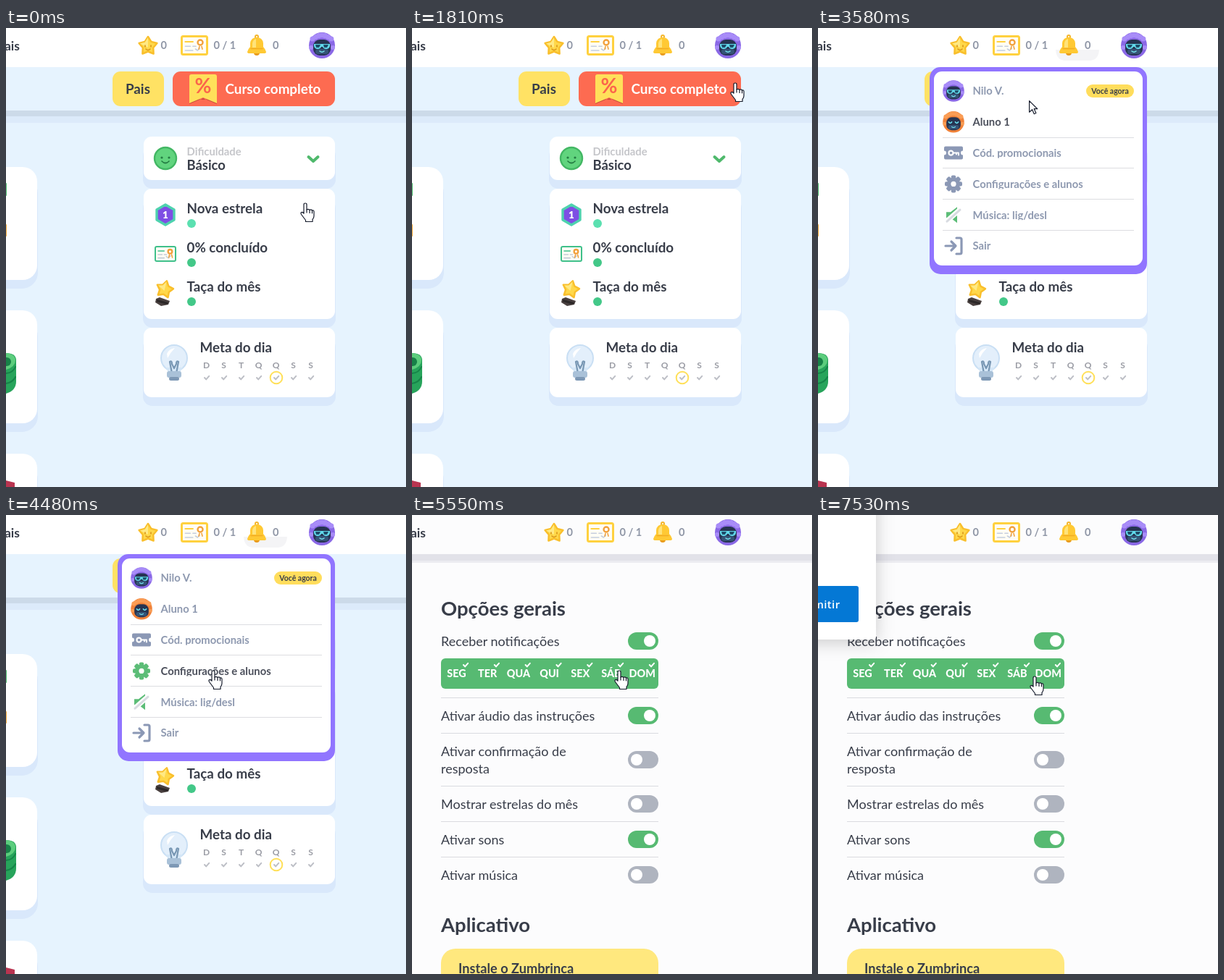
These frames come from a looping animation (552 px wide and 634 px high, 8 s). An HTML page:

```html
<!DOCTYPE html>
<html lang="pt">
<head>
<meta charset="utf-8">
<style>
html, body { margin: 0; width: 100%; height: 100%; overflow: hidden; background: #fff; }
svg { position: absolute; left: 0; top: 0; font-family: Lato, sans-serif; }
#menu { left: 154px; top: 54px; transform-origin: 50% 0; }
#menu .row { color: #8e99b0; }
#menu .row.hover { color: #4c505c; }
#menu .icon { color: #8b98b5; }
#menu .hover .icon { color: #5cbd77; }
#pointer { overflow: visible; }
</style>
</head>
<body>
<svg id="stage" width="552" height="634"></svg>
<svg id="menu" width="300" height="286" viewBox="154 54 300 286"></svg>
<svg id="pointer" width="20" height="28" stroke="#161c2c" stroke-width="1.2" stroke-linejoin="round" stroke-linecap="round">
  <g id="hand">
    <path fill="#fff" d="M-2 2q0-2 2-2t2 2v7q2-1.5 4 .3 2-1 3.5.7 2.2-.6 2.5 1.5v6q0 3-2 5v3H.5v-2l-6-8q-1.5-3 1-3.2 1.5 0 2.5 2z"/>
    <path fill="none" d="M2 9v4M6 9.5v4M9.5 10.3v3.5"/>
  </g>
  <path id="arrow" fill="#fff" d="M.6.6v15.6l4-3.5 2.7 6 2.6-1.2-2.7-5.8h4.6z"/>
</svg>
<script>
const $ = id => document.getElementById(id);
const DARK = '#383d49', GRAY = '#8f96a6', GREEN = '#57ba72', YELLOW = '#ffe264';

const rect = (x, y, w, h, r, fill, more = '') =>
  `<rect x="${x}" y="${y}" width="${w}" height="${h}" rx="${r}" fill="${fill}" ${more}/>`;
const circle = (x, y, r, fill, more = '') => `<circle cx="${x}" cy="${y}" r="${r}" fill="${fill}" ${more}/>`;
const path = (d, fill, more = '') => `<path d="${d}" fill="${fill}" ${more}/>`;
const line = (d, color, width = 1) =>
  path(d, 'none', `stroke="${color}" stroke-width="${width}" stroke-linecap="round" stroke-linejoin="round"`);
const text = (x, y, size, str, fill = DARK, weight = 700, anchor = 'start') =>
  `<text x="${x}" y="${y}" font-size="${size}" fill="${fill}" font-weight="${weight}" text-anchor="${anchor}">${str}</text>`;
const group = (x, y, body, scale = 1, turn = 0) =>
  `<g transform="translate(${x} ${y}) scale(${scale}) rotate(${turn})">${body}</g>`;
const check = (x, y, color, width = 2) => line(`M${x - 3} ${y}l2.2 2.4 4-4.6`, color, width);
const range = n => [...Array(n).keys()];

const star = r => {
  const points = range(10).map(i => {
    const a = i * Math.PI / 5, d = i % 2 ? r * .58 : r;
    return `${(d * Math.sin(a)).toFixed(1)} ${(-d * Math.cos(a)).toFixed(1)}`;
  });
  return path(`M${points.join('L')}z`, '#ffd84a', 'stroke="#f9bf2c" stroke-width="2.5" stroke-linejoin="round"') +
    path(`M0 ${-r + 1}L${-r * .33} ${-r * .4} ${-r + 2} ${-r * .27} 0 2z`, '#ffe984');
};

const avatar = (x, y, scale, hair, light, shades) => group(x, y,
  circle(0, 0, 18, hair) +
  range(7).map(i => circle(-13 + i * 4.3, -9 - 5 * Math.sin(i * Math.PI / 6), 3.6, light)).join('') +
  circle(-15, 3, 3, light) + circle(15, 3, 3, light) +
  rect(-12, -8, 24, 22, 9, '#263451') +
  rect(-9, 5, 18, 7, 3.5, '#355477') +
  (shades
    ? path('M-11-2H11V1Q10 5 6 5 2 5 1 2H-1Q-2 5-6 5-10 5-11 1z', '#61d8ea') +
      path('M-9-1h7l-2 4h-4zM2-1h7l-2 4H3z', '#1d4b68')
    : line('M-8 0q2.5 4 5 0M3 0q2.5 4 5 0', '#66dced', 2)) +
  line('M-3 8q3 2.5 6 0', '#76e5f1', 1.5), scale);

const certificate = (x, y, w, h, border, ink, thick) =>
  rect(x, y, w, h, 2, '#fffdf5', `stroke="${border}" stroke-width="${thick}"`) +
  line(`M${x + w * .14} ${y + h * .3}h${w * .3}`, border, thick * .7) +
  line(`M${x + w * .14} ${y + h * .55}h${w * .2}m${w * .1} 0h${w * .12}M${x + w * .14} ${y + h * .78}h${w * .3}m${w * .1}-2l3 2 3-3`, ink, 1.6) +
  circle(x + w * .73, y + h * .34, w * .1, '#fff', 'stroke="#f2a13d" stroke-width="2.4"') +
  line(`M${x + w * .7} ${y + h * .55}l-1 4m4-4l1 4`, '#f2a13d', 1.5);

const bell = circle(0, -12, 2, 'none', 'stroke="#f4b52c" stroke-width="2"') +
  circle(0, 10, 4, '#e99b1c') +
  path('M-13 9Q-12 5-9 2V-3Q-8-11 0-11T9-3V2Q12 5 13 9 13 11 10 11H-10Q-13 11-13 9z', '#ffc934') +
  path('M-6 3V-3Q-5-8-1-9V3z', '#ffe37a') + line('M-8 4.5H8', '#f1ad23', 1.5);

const header = () =>
  text(19, 31, 17.5, 'Mais', DARK, 700, 'end') +
  group(196, 25, star(13) + line('M-4-1v2M4-1v2M-3 4q3 3 6 0', '#d9941b', 1.6)) +
  text(213.5, 29, 14.6, '0', GRAY) +
  certificate(242.5, 11.5, 35, 25, '#ffd13f', '#c5cede', 3) +
  text(286.5, 29, 14.6, '0 / 1', GRAY) +
  `<path id="bellShade" d="M328 30H388Q387 45 374 45H342Q329 45 328 30z" fill="#f4f4f6"/>` +
  group(346, 24, bell) + text(368, 29, 14.6, '0', GRAY) +
  avatar(436, 24, 1, '#8a68e6', '#a88cf8', true);

const card = (x, y, w, h, r) =>
  rect(x - 1, y + 14, w + 2, h - 2, r + 2, '#d9e8fb') + rect(x, y, w, h, r, '#fff');

const bulb =
  circle(0, -6, 18, '#e3effb', 'stroke="#c9dff4" stroke-width="2"') +
  path('M-12 7Q-8 11-8 17H8Q8 11 12 7z', '#d5e7f7') +
  path('M-10-12Q-7-19 1-20-5-14-9-6z', '#fff') +
  line('M-3 15L-6-1q3-2 3 3l3 6 3-6q0-5 3-3L3 15', '#7897b4', 2.2) +
  rect(-10, 12, 20, 9, 3, '#a9c1d8') + rect(-7, 20, 14, 5, 2.5, '#7d98b5');

const home = () => {
  const stats = [['Nova estrela', '#5be0b0'], ['0% concluído', '#43c888'], ['Taça do mês', '#43c888']];
  return rect(0, 0, 552, 634, 0, '#e6f3fe') +
    rect(0, 121, 552, 10, 0, '#dceafa') + rect(0, 114, 552, 8, 0, '#ccdae9') +
    rect(0, 0, 552, 54, 0, '#fff') +
    rect(147, 60, 71, 48, 11, YELLOW) + text(165, 91, 18.8, 'Pais') +
    rect(230, 60, 224, 48, 11, '#fd6b51') +
    path('M253 96l19 3 19-3v9l-19-8-19 8z', '#c44b3a') +
    path('M253 67q0-3 3-3h32q3 0 3 3v37l-19-8-19 8z', '#ffe05a') +
    text(272, 90, 28, '%', '#fb654b', 700, 'middle') +
    text(302.5, 91, 18.8, 'Curso completo', '#fff') +

    [192, 390, 588].map(y => card(-120, y, 163, 156, 20)).join('') +
    rect(-6, 214, 7, 18, 1, '#4fbf72') + rect(-6, 271, 7, 17, 1, '#f4ac3d') +
    path('M0 449Q14 449 14 459V488Q14 501 0 505z', '#27a45b') +
    path('M0 449Q13 450 13 459T0 472z', '#5ccd7d') + circle(1, 461, 6, '#178147') +
    line('M13 468q-3 8-13 9M13 482q-3 7-13 9', '#168449', 2) +
    path('M0 625l12 3v6H0z', '#b93450') +

    card(190, 150, 264, 60, 11) + card(190, 222, 264, 180, 11) + card(190, 414, 264, 96, 11) +
    circle(220, 180, 15, '#61d47e', 'stroke="#43b764" stroke-width="2.4"') +
    circle(215, 179, 1.6, '#247c43') + circle(225, 179, 1.6, '#247c43') +
    line('M215 184q5 5 10 0', '#247c43', 1.7) +
    text(249.5, 176, 14.8, 'Dificuldade', '#c5c6ca') + text(249.5, 196, 18.4, 'Básico') +
    line('M417.5 178l6.5 6 6.5-6', '#4fb96c', 4) +

    stats.map(([label, dot], i) =>
      text(249.5, 256 + 54 * i, 18.8, label) + circle(256, 270 + 54 * i, 6, dot)).join('') +
    path('M220 244l12 7v14l-12 7-12-7v-14z', '#7e4ee4', 'stroke="#4ed2ae" stroke-width="3.4" stroke-linejoin="round"') +
    text(220, 263, 13.5, '1', '#fff', 900, 'middle') +
    certificate(206, 302, 28, 20, '#3fc08a', '#c2ccd8', 2) +
    path('M207 374l5-2 14 5-2 5-10 2-8-5z', '#49403f') + path('M208 375l16 4-2 3-14-4z', '#2c2828') +
    group(219, 361, star(12), 1, 14) +

    group(232, 462, bulb) + text(267.5, 448, 18.8, 'Meta do dia') +
    [...'DSTQQSS'].map((d, i) =>
      text(276.5 + 24 * i, 470, 12, d, '#9b9da5', 700, 'middle') + check(277 + 24 * i, 483, '#bdbfc6')).join('') +
    circle(373, 483, 8.3, 'none', 'stroke="#ffe05a" stroke-width="2"');
};

const toggle = (y, on) => rect(298, y - 12, 42, 24, 12, on ? GREEN : '#afb4bf') + circle(on ? 328 : 310, y, 8, '#fff');

const options = () => {
  const rows = [
    [174, 1, 'Receber notificações'], [277, 1, 'Ativar áudio das instruções'],
    [338, 0, 'Ativar confirmação de', 'resposta'], [399, 0, 'Mostrar estrelas do mês'],
    [448, 1, 'Ativar sons'], [497, 0, 'Ativar música']];
  return text(40, 139, 27.5, 'Opções gerais') +
    rows.map(([y, on, ...lines]) => toggle(y, on) + lines.map((s, i) =>
      text(40, y + 7 - 12 * (lines.length - 1) + 24 * i, 18, s, DARK, 400)).join('')).join('') +
    rect(40, 198, 300, 42, 6, GREEN) +
    ['SEG', 'TER', 'QUA', 'QUI', 'SEX', 'SÁB', 'DOM'].map((d, i) =>
      text(61.5 + 42.7 * i, 224, 14.4, d, '#fff', 800, 'middle') + check(74 + 42.8 * i, 207, '#fff')).join('') +
    [252, 301, 374, 423, 472].map(y => rect(40, y, 300, 1, 0, '#dadbe0')).join('') +
    text(40, 576, 27.5, 'Aplicativo') +
    rect(40, 599, 300, 80, 20, '#ffe87e') + text(64, 633, 18.2, 'Instale o Zumbrinca');
};

const popup = () =>
  rect(-300, -60, 380, 232, 4, '#fff', 'style="filter:drop-shadow(0 4px 12px #0003)"') +
  rect(-80, 98, 136, 50, 3, '#0478d5') +
  `<g font-family="Open Sans, sans-serif" letter-spacing=".4">${text(30.5, 129, 15, 'Permitir', '#fff', 600, 'end')}</g>`;

const gear = range(4).map(i => group(0, 0, rect(-3.2, -12, 6.4, 24, 2, 'currentColor'), 1, 45 * i)).join('') +
  circle(0, 0, 9, 'currentColor') + circle(0, 0, 3.6, '#fff');
const ticket = path('M-13-7q0-2 2-2h22q2 0 2 2v4a3 3 0 0 0 0 6v4q0 2-2 2h-22q-2 0-2-2v-4a3 3 0 0 0 0-6z', 'currentColor') +
  circle(-3.5, 0, 3, 'none', 'stroke="#fff" stroke-width="2.2"') + line('M0 0h7v3M4 0v2', '#fff', 2);
const speaker = path('M-10-4h6L5-11V11L-4 4h-6z', '#5cbd77') + line('M-12 11L12-10', '#fff', 7) + line('M-9 9L9-7', '#d8dbe1', 3);
const exit = line('M-11 0H3M-3-6l6 6-6 6M4-11h5q2 0 2 2V9q0 2-2 2H4', 'currentColor', 3.2);

const menu = () => {
  const items = [
    ['Nilo V.', avatar(0, 0, .82, '#8a68e6', '#a88cf8', true)],
    ['Aluno 1', avatar(0, 0, .82, '#f08239', '#fa9d55', false)],
    ['Cód. promocionais', ticket], ['Configurações e alunos', gear],
    ['Música: lig/desl', speaker], ['Sair', exit]];
  return rect(154, 54, 300, 286, 15, '#9175ff') + rect(160, 60, 288, 268, 11, '#fff') +
    items.map(([label, icon], i) => {
      const y = 87 + 42.8 * i;
      return `<g class="row"><g class="icon">${group(187, y, icon)}</g>` +
        text(213.5, y + 5.3, 14.8, label, 'currentColor') +
        rect(212, y + 7, 170, 4, 0, '#fff') + '</g>' +
        (i > 1 ? rect(172, Math.round(y - 22), 264, 1, 0, '#dcdde1') : '');
    }).join('') +
    rect(370, 78, 66, 18, 9, '#ffdd5c') + text(403, 91, 10.5, 'Você agora', DARK, 700, 'middle');
};

$('stage').innerHTML = `<g id="home">${home()}</g><g id="settings">` +
  rect(0, 0, 552, 634, 0, '#fcfcfd') + rect(0, 62, 552, 4, 0, '#ececf1') + rect(0, 54, 552, 9, 0, '#e2e2e9') +
  `<g id="options">${options()}</g></g><g id="header">${header()}</g><g id="popup">${popup()}</g>`;
$('menu').innerHTML = menu();

// Each row: start time, then the values held from there.
const pointerSteps = [
  [0, 413, 242], [1450, 439, 197], [1570, 445, 155], [1690, 447, 112], [1810, 446, 76],
  [1950, 444, 48], [2075, 443, 35], [2200, 442, 29], [2840, 438, 42], [2960, 425, 62],
  [3080, 402, 82], [3200, 366, 96], [3320, 328, 101], [3440, 303, 101], [3580, 291, 100],
  [3700, 288, 120], [3820, 286, 158], [3940, 285, 194], [4060, 284, 211], [4190, 284, 216],
  [4330, 285, 216], [4480, 286, 215], [6790, 289, 218], [6910, 294, 221], [7030, 298, 222],
  [7410, 298.5, 222.5], [7530, 299, 223]];
const menuSteps = [
  [0, 0, 0], [2580, .05, 20], [2720, .5, 10], [2840, .9, 2], [2960, 1, 0],
  [5170, .87, 2], [5290, .4, 10], [5410, .06, 20], [5550, 0, 0]];
const hoverSteps = [[0, -1], [3440, 1], [3820, 2], [3940, 3]];
const popupSteps = [[0, 0, 0], [5930, .25, -12], [6050, .6, -6], [6170, .85, -2], [6290, 1, 0]];

const at = (steps, t) => steps.findLast(s => s[0] <= t).slice(1);
const show = (id, on) => $(id).style.display = on ? '' : 'none';

function draw(now) {
  const t = now % 8000;
  const shift = t >= 5170 && t < 5550 ? 8 : 0;
  show('home', t < 5170);
  show('settings', t >= 5170);
  show('options', t >= 5550);
  show('bellShade', t >= 2200 && t < 5170);
  $('header').setAttribute('transform', `translate(${shift})`);

  const [opacity, angle] = at(menuSteps, t);
  $('menu').style.opacity = opacity;
  $('menu').style.transform = `translateX(${shift}px) perspective(1000px) rotateX(${-angle}deg)`;
  const [hovered] = at(hoverSteps, t);
  document.querySelectorAll('.row').forEach((row, i) => row.classList.toggle('hover', i === hovered));

  const [fade, rise] = at(popupSteps, t);
  $('popup').setAttribute('opacity', fade);
  $('popup').setAttribute('transform', `translate(0 ${rise})`);

  const [x, y] = at(pointerSteps, t);
  const arrow = t >= 2960 && t < 3700;
  show('arrow', arrow);
  show('hand', !arrow);
  $('pointer').style.transform = `translate(${x}px, ${y}px)`;
  requestAnimationFrame(draw);
}
draw(0);
</script>
</body>
</html>
```
